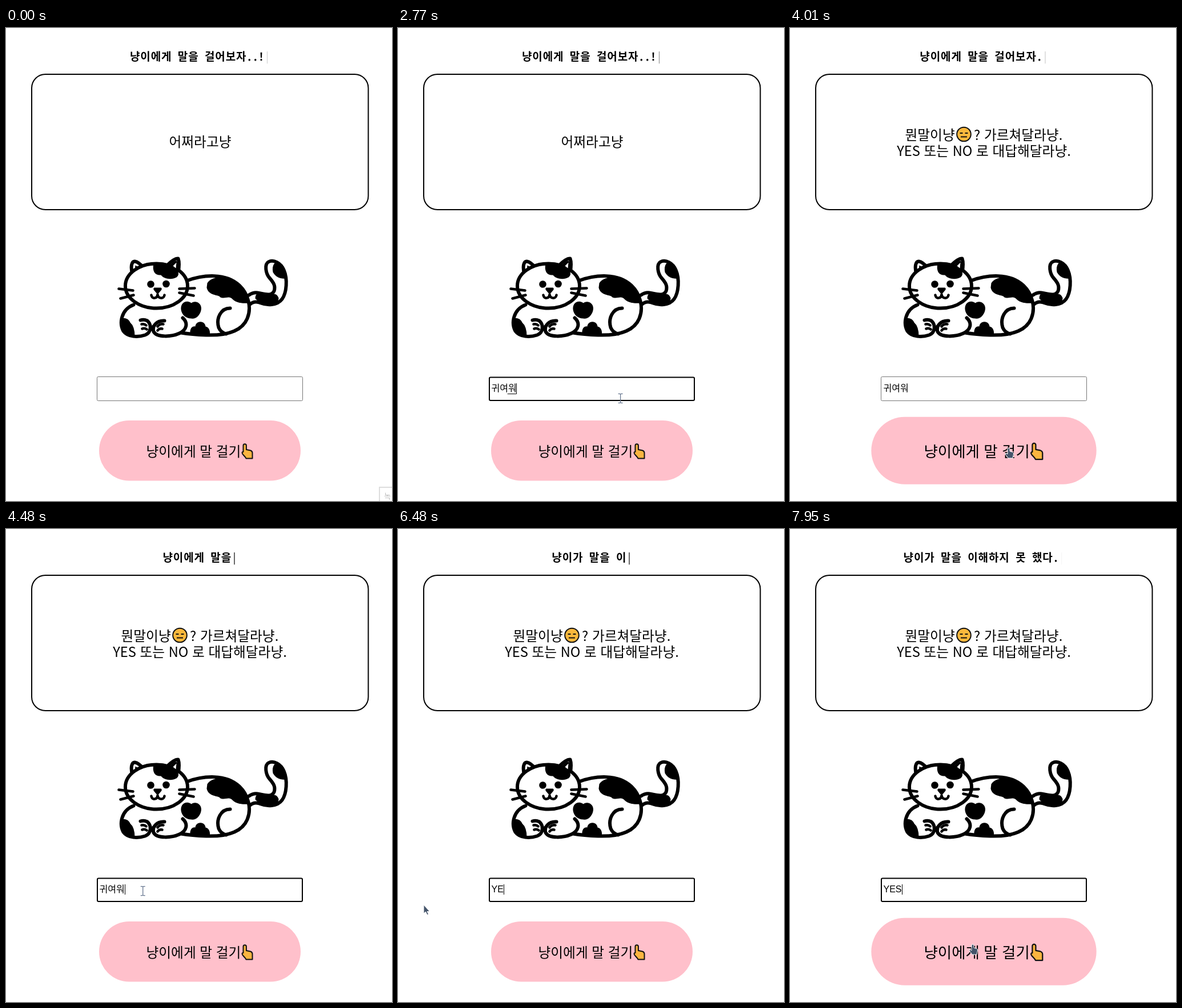
An HTML page that plays this animation: 676x828 px, repeating every 8000 ms.

```html
<!DOCTYPE html>
<html lang="ko">
<head>
<meta charset="utf-8">
<style>
html, body { margin: 0; width: 100%; height: 100%; overflow: hidden; background: #fff; }
svg { display: block; }
text { white-space: pre; }
.body { font: 500 23.7px "Noto Sans CJK KR", "Noto Sans KR", sans-serif; }
#title { font: 700 19px "Noto Sans Mono CJK KR", "Noto Sans CJK KR", monospace; letter-spacing: 0.9px; text-anchor: middle; }
#bar { font-weight: 400; }
#typed { font: 300 16px "Liberation Sans", "Noto Sans Mono CJK KR", "Noto Sans CJK KR", sans-serif; }
#cat { fill: #fff; stroke: #000; stroke-width: 6; stroke-linecap: round; stroke-linejoin: round; }
#cat .spot { fill: #000; stroke: none; }
#cat .line { fill: none; }
#cat .thin { fill: none; stroke-width: 4.5; }
#mouse path { fill: #44546a; stroke: #fff; }
#mouse #ibeam { fill: none; stroke: #66768f; stroke-width: 1.3; }
</style>
</head>
<body>
<svg width="676" height="828" viewBox="0 0 676 828">
  <text id="title" x="340" y="57"><tspan id="words"></tspan><tspan id="bar">|</tspan></text>
  <rect x="45" y="81" width="589.5" height="237" rx="24" fill="none" stroke="#000" stroke-width="2"/>

  <text id="before" class="body" x="340" y="207.5" text-anchor="middle">어쩌라고냥</text>
  <g id="after" class="body">
    <text x="201.5" y="195.5">뭔말이냥</text>
    <circle cx="304.5" cy="186" r="12.3" fill="#fbb83c" stroke="#111" stroke-width="2"/>
    <path d="M297.5 184h5M306.5 184h5M299 190.5h11" stroke="#111" stroke-width="1.8"/>
    <text x="322" y="195.5">? 가르쳐달라냥.</text>
    <text x="339.5" y="223.5" text-anchor="middle">YES 또는 NO 로 대답해달라냥.</text>
  </g>

  <g id="cat" transform="translate(0.5 -0.5)">
    <path d="M425 468Q432 463 440 464C452 466 464 471 469 461C472 452 468 446 461 438C454 430 452 414 459 410C468 405 481 412 486 424C493 440 491 464 483 475C474 487 456 486 446 482Q434 477 426 485"/>
    <path class="spot" d="M470 412C480 411 489 425 490 439C480 440 472 437 467 428Q465 418 470 412ZM436 474Q436 465 444 464Q454 471 464 466Q474 464 477 473Q477 484 462 487Q446 486 436 474Z"/>
    <path d="M316 443C345 432 385 429 408 451C424 466 430 490 422 509C412 533 382 539 350 538Q325 537 306 534L240 515L240 480Z"/>
    <path class="spot" d="M352 447C361 433 393 431 409 449C421 461 427 474 424 482C411 483 401 481 395 474C389 469 382 475 375 472C373 467 354 470 351 455Z"/>
    <path class="spot" d="M306 493C305 480 317 476 324 482C332 476 344 483 341 495C339 504 331 511 324 509C314 509 307 502 306 493Z"/>
    <path class="spot" d="M322 537C321 526 326 522 331 523C332 512 348 512 349 523C355 524 358 531 356 539Z"/>
    <path class="line" d="M392 491C376 491 367 508 372 525Q376 534 385 536"/>
    <path stroke="none" d="M222 484C200 495 198 520 206 532Q220 545 242 539L256 520L262 540Q292 544 306 534Q320 524 311 509L300 482Z"/>
    <path class="line" d="M223 485C200 494 198 518 205 531C213 542 231 542 243 538C254 534 255 520 247 513Q241 510 235 512M277 513C264 512 255 522 258 532C264 543 290 541 303 535C316 529 319 517 309 508"/>
    <path class="thin" d="M237 519Q242 518 245 521M238 527Q242 525 246 528M275 519Q269 518 265 523M273 527Q268 526 265 530"/>
    <path class="spot" d="M202 508Q213 507 217 516Q225 523 225 540Q211 541 204 531Z"/>
    <path d="M221 432C217 417 220 409 225 409C231 410 237 416 241 421M281 417Q293 404 301 404Q304 412 301 429"/>
    <ellipse cx="263" cy="452" rx="54.5" ry="39"/>
    <path class="spot" d="M225 425L226 416Q231 418 234 422ZM287 415Q294 407 299 408Q301 416 299 424Z"/>
    <path class="spot" d="M258 413C255 427 261 434 271 433C277 441 291 441 298 437C304 433 302 425 296 420Q280 409 258 413Z"/>
    <path d="M292 417L298 411L297 421Z" stroke="none"/>
    <circle class="spot" cx="253" cy="449" r="6.3"/>
    <circle class="spot" cx="280" cy="448.5" r="6.3"/>
    <path class="spot" d="M259 455H271Q274 457 270 461L265 467L260 461Q256 457 259 455Z"/>
    <path class="thin" d="M254 468C255 475 264 475 265 467C266 475 276 475 277 468M197 457L222 460M200 474L223 468M303 457L330 456M303 464L328 469"/>
  </g>

  <rect id="field" rx="2" fill="#fff"/>
  <rect id="selection" y="621" height="22" fill="#3390ff"/>
  <text id="typed" x="163.5" y="636"></text>
  <path id="underline" stroke="#000"/>
  <path id="caret" stroke="#000"/>

  <g id="button">
    <rect x="163" y="687" width="353" height="105.5" rx="52.7" fill="#ffc0cb"/>
    <text class="body" x="245.5" y="750">냥이에게 말 걸기</text>
    <path d="M415.5 731a2.7 2.7 0 0 1 5.4 0V738L428 739.5Q431.5 740.5 431.5 744V753.5H420.5C418 748.5 413.5 747 413.5 743.5Q414 741.5 415.5 742Z" fill="#fbb540" stroke="#111" stroke-width="2" stroke-linejoin="round"/>
  </g>

  <g id="corner">
    <path d="M676 804H654V828" fill="none" stroke="#ddd" stroke-width="2"/>
    <text x="662" y="824" font-family="Noto Sans CJK KR, sans-serif" font-size="13" fill="#bbb">녹</text>
  </g>

  <g id="mouse">
    <path id="arrow" d="M0 0V15L3.5 12L6 17.5L8.5 16.5L6 11.5H10.5Z"/>
    <path id="hand" d="M-2 2a2 2 0 0 1 4 0V6L7 7.5Q9 8.5 8.5 11L7 18H-1L-6 11Q-6 8.5-4 9.5L-2 11Z"/>
    <path id="ibeam" d="M-4-8H-1L0-7L1-8H4M0-7V7M-4 8H-1L0 7L1 8H4"/>
  </g>
</svg>
<script>
const LOOP = 8000;
const FIRST = '냥이에게 말을 걸어보자..!', SECOND = '냥이가 말을 이해하지 못 했다.';
const CLICK = 3720, REPLY = 3800, PRESS = 4260;

// [time, text]
const TYPING = [[620, ''], [1510, 'ㄱ'], [1650, '구'], [1800, '귀'], [1940, '귕'], [2010, '귀여'],
  [2150, '귀영'], [2220, '귀여우'], [2360, '귀여워'], [5900, 'Y'], [6340, 'YE'], [6750, 'YES']];
// [time, x, y]
const MOUSE = [[80, 690, 835], [420, 545, 660], [680, 393, 611], [2620, 393, 611], [3050, 381, 743],
  [3450, 381, 743], [3560, 383, 735], [4020, 383, 735], [4200, 252, 632], [4400, 252, 632],
  [4950, 43, 660], [5250, 45, 658], [7170, 45, 658], [7720, 320, 727]];

const $ = id => document.getElementById(id);
const clamp = v => Math.min(1, Math.max(0, v));
const smooth = v => v * v * (3 - 2 * v);
const show = (id, on) => $(id).style.display = on ? '' : 'none';
const set = (id, attrs) => Object.entries(attrs).forEach(([k, v]) => $(id).setAttribute(k, v));

function mouseAt(t) {
  const next = MOUSE.findIndex(k => k[0] > t);
  if (next < 1) return MOUSE.at(next).slice(1);
  const [a, b] = [MOUSE[next - 1], MOUSE[next]];
  const p = smooth((t - a[0]) / (b[0] - a[0]));
  return [1, 2].map(i => a[i] + (b[i] - a[i]) * p);
}

function drawTitle(t) {
  const erased = Math.max(0, Math.floor((t - 3855) / 75));
  const added = Math.max(0, Math.floor((t - 5120) / 152));
  $('words').textContent = t < 5120 ? FIRST.slice(0, Math.max(0, FIRST.length - erased)) : SECOND.slice(0, added);
  const phase = (t / 1000 + 0.07) % 1;
  $('bar').setAttribute('fill-opacity', smooth(1 - Math.abs(2 * phase - 1)) ** 0.6);
}

function drawField(t, mouseX) {
  const focused = t > 620 && t < CLICK || t > PRESS;
  set('field', focused
    ? { x: 160, y: 611.5, width: 359, height: 40.5, stroke: '#000', 'stroke-width': 2 }
    : { x: 159.5, y: 610.5, width: 360, height: 42, stroke: '#767676', 'stroke-width': 1 });

  const [since, value] = TYPING.findLast(k => k[0] <= t) || [0, ''];
  const typed = $('typed');
  typed.textContent = value;
  const left = 163.5, width = value ? typed.getComputedTextLength() : 0, end = left + width;

  const selecting = t > 4400 && t < 5900;
  const chars = selecting ? Math.round(clamp((end - mouseX) / width) * value.length) : 0;
  const selected = width * chars / (value.length || 1);
  show('selection', chars > 0);
  set('selection', { x: end - selected, width: selected });
  typed.setAttribute('fill', chars > 1 ? '#fff' : '#000');

  const composing = value && t < CLICK;
  show('underline', composing);
  set('underline', { d: `M${end - 16} 640.5H${end}` });
  const blinkStart = t > PRESS && t < 5900 ? PRESS : since;
  show('caret', focused && !chars && (t - blinkStart) % 1060 < 530);
  const x = Math.round(end) + 0.5 - (composing ? 1 : 0);
  set('caret', { d: `M${x} 622V640` });
}

function draw() {
  const t = performance.now() % LOOP;
  const [x, y] = mouseAt(t);
  drawTitle(t);
  drawField(t, x);
  show('before', t < REPLY);
  show('after', t >= REPLY);
  show('corner', t < 100);

  const ramp = (start, length) => smooth(clamp((t - start) / length));
  const hover = ramp(2860, 200) - ramp(4070, 140) + ramp(7430, 200);
  set('button', { transform: `translate(339.5 739.8) scale(${1 + 0.117 * hover}) translate(-339.5 -739.8)` });

  const overField = x > 159 && x < 520 && y > 610 && y < 652;
  const overButton = x > 163 && x < 516 && y > 687 && y < 792;
  show('mouse', t >= 80);
  show('ibeam', overField);
  show('hand', overButton);
  show('arrow', !overField && !overButton);
  set('mouse', { transform: `translate(${x} ${y})` });
  requestAnimationFrame(draw);
}
draw();
</script>
</body>
</html>
```
